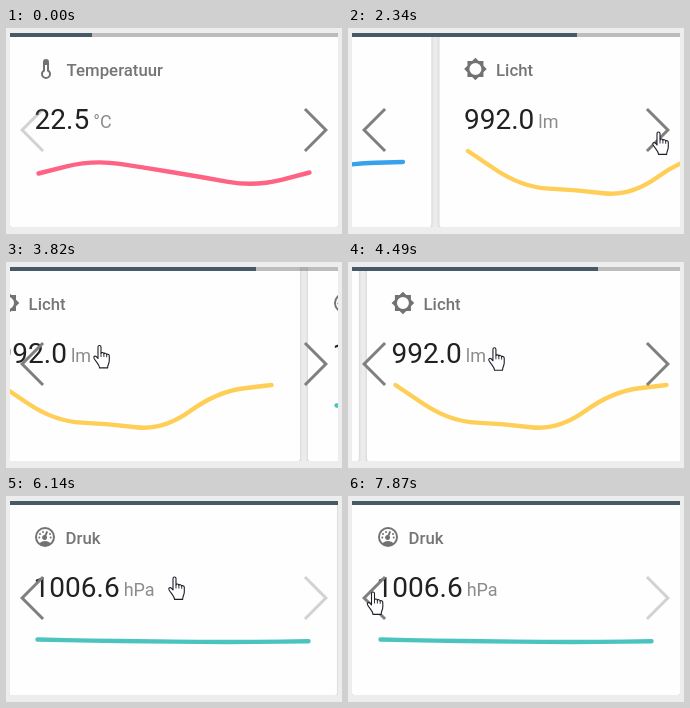
An HTML page that plays this animation: 336x206 px, repeating every 8 s.

```html
<!DOCTYPE html>
<html lang="nl">
<head>
<meta charset="utf-8">
<title>Sensor carousel</title>
<style>
  html, body { margin: 0; width: 100%; height: 100%; overflow: hidden; background: #ededed; }
  #stage { position: relative; width: 336px; height: 206px; overflow: hidden; }
  #view { position: absolute; left: 4px; top: 5px; width: 328px; height: 194px; overflow: hidden; }
  #track { position: absolute; inset: 0; }
  .card {
    position: absolute; top: 0; width: 328px; height: 194px; background: #fefefe; border-radius: 2px;
    box-shadow: 0 2px 2px rgba(0,0,0,.1), 0 1px 4px rgba(0,0,0,.1);
  }
  svg { position: absolute; left: 0; top: 0; display: block; overflow: visible; }
  text { font-family: Roboto, "Open Sans", sans-serif; }
  .name { font-size: 16.8px; font-weight: 500; fill: #757575; }
  .value { font-size: 28px; fill: #212121; }
  .unit { font-size: 18px; fill: #8c8c8c; }
  .icon { fill: #727272; fill-rule: evenodd; }
  .line { fill: none; stroke-width: 4.4; stroke-linecap: round; stroke-linejoin: round; }
  .arrow { fill: #7f7f7f; }
  #rail { position: absolute; left: 0; top: 0; width: 100%; height: 4px; background: rgba(0,0,0,.26); }
  #bar { height: 100%; background: #455a64; }
</style>
</head>
<body>
<div id="stage">
  <div id="view">
    <div id="track"></div>
    <div id="rail"><div id="bar"></div></div>
  </div>
  <svg width="336" height="206">
    <path id="prev" class="arrow" transform="translate(14 80)" d="M0 22 22 0l2.1 2.1L4.2 22l19.9 19.9L22 44Z"/>
    <path id="next" class="arrow" transform="translate(295 80)" d="M27 22 5 44l-2.1-2.1L22.8 22 2.9 2.1 5 0Z"/>
    <g id="hand" stroke="#1c1c28" stroke-width="1.1" stroke-linejoin="round">
      <path fill="#fff" d="M5 2.6C5 .4 8 .4 8 2.6V9C8.2 7.6 10.8 7.8 10.9 9.4 11.2 8.2 13.6 8.4 13.7 10.2 14 9.2 16.3 9.5 16.3 11.3V16C16.3 19 14.6 20 14.6 23.4H6.6C6.6 20.2 3.8 18.5 1 13.7.2 12 2.1 10.9 3.4 12.2L5 14Z"/>
      <path fill="none" stroke-width=".9" d="M8 9v3.5M10.9 9.4v3.1M13.7 10.2v2.6"/>
    </g>
  </svg>
</div>
<script>
const LOOP = 8000, PITCH = 336, SLIDE_MS = 300;
const $ = id => document.getElementById(id);
const mix = (a, b, p) => a + (b - a) * p;
const clamp = p => Math.min(1, Math.max(0, p));

const dot = (x, y, r) => `M${x - r} ${y}a${r} ${r} 0 1 0 ${2 * r} 0a${r} ${r} 0 1 0 ${-2 * r} 0Z`;
const icons = {
  thermometer: 'M17 17A5 5 0 0 1 7 17C7 15.4 7.8 13.9 9 13V5A3 3 0 0 1 15 5V13C16.2 13.9 17 15.4 17 17'
    + 'M11 8V14.2C9.8 14.6 9 15.7 9 17A3 3 0 0 0 15 17C15 15.7 14.2 14.6 13 14.2V8Z',
  drop: 'M12 20A6 6 0 0 1 6 14C6 10 12 3.25 12 3.25S18 10 18 14A6 6 0 0 1 12 20Z',
  sun: dot(12, 12, 6) + 'M20 15.3 23.3 12 20 8.7V4H15.3L12 .7 8.7 4H4V8.7L.7 12 4 15.3V20H8.7L12 23.3 15.3 20H20Z',
  gauge: dot(12, 12, 10) + 'M12 4A8 8 0 0 1 20 12C20 14.4 19 16.5 17.3 18 15.9 16.7 14 16 12 16S8.2 16.7 6.7 18C5 16.5 4 14.4 4 12A8 8 0 0 1 12 4Z'
    + 'M13.1 6.5 11.6 10A2.5 2.5 0 1 0 13.4 10.8L14.9 7.3A1 1 0 0 0 13.1 6.5Z'
    + dot(10, 7, 1) + dot(7, 9, 1) + dot(17, 9, 1) + dot(6.3, 12.5, 1) + dot(17.7, 12.5, 1)
};

// levels: evenly spaced heights that shape the graph
const cards = [
  { name: 'Temperatuur', value: '22.5', unit: '°C', icon: 'thermometer', color: '#ff6384',
    levels: [145.5, 131.8, 140, 149, 158.6, 144.5] },
  { name: 'Vochtigheid', value: '45.2', unit: '%', icon: 'drop', color: '#36a2eb',
    levels: [150, 158, 153, 147, 135.5, 134] },
  { name: 'Licht', value: '992.0', unit: 'lm', icon: 'sun', color: '#ffce56',
    levels: [123, 159.5, 161.8, 168.6, 129.4, 123] },
  { name: 'Druk', value: '1006.6', unit: 'hPa', icon: 'gauge', color: '#4bc4c0',
    levels: [143.5, 144.8, 145.3, 146, 146, 145.3] }
];

// Quadratic curve through the midpoints of neighbouring levels
function graph(levels) {
  const pts = levels.map((y, i) => [32.5 + i * 54.2, y]);
  const mids = pts.slice(1).map((p, i) => [(p[0] + pts[i][0]) / 2, (p[1] + pts[i][1]) / 2]);
  const curves = mids.slice(1).map((m, i) => `Q${pts[i + 1]} ${m}`);
  return `M${pts[0]}L${mids[0]}${curves.join('')}L${pts.at(-1)}`;
}

$('track').innerHTML = cards.map((c, i) => `
  <div class="card" style="left:${i * PITCH}px">
    <svg width="328" height="194" viewBox="4 5 328 194">
      <path class="icon" transform="translate(28 29)" d="${icons[c.icon]}"/>
      <text class="name" x="60.6" y="48">${c.name}</text>
      <text class="value" x="28.6" y="101">${c.value}<tspan class="unit" dx="4" dy="-1">${c.unit}</tspan></text>
      <path class="line" stroke="${c.color}" d="${graph(c.levels)}"/>
    </svg>
  </div>`).join('');

// The screen refreshes in short bursts and rests in between: [first, last, refreshes]
const bursts = [
  [460, 1010, 5], [1570, 1870, 3], [2340, 2770, 4], [3670, 3820, 2],
  [4250, 5010, 7], [5280, 5860, 5], [6140, 7070, 8], [7600, 7870, 3]
];
function refreshed(t) {
  const burst = bursts.findLast(b => b[0] <= t);
  if (!burst) return 0;
  const [first, last, count] = burst, step = (last - first) / (count - 1);
  return Math.min(last, first + Math.floor((t - first) / step + 1e-6) * step);
}

// Pointer path: [time, x, y]
const path = [
  [0, 340, 110], [460, 328, 109], [740, 320, 109], [1010, 304, 103], [2460, 304, 103], [2770, 125, 85],
  [3670, 115, 84], [3820, 87, 82.5], [4430, 145, 85], [4730, 225, 85], [5010, 154, 78], [5280, 147.5, 76],
  [5560, 60, 80], [5710, 260, 70], [5860, 163, 80], [6140, 162, 80], [6400, 80, 72], [6670, 70, 71],
  [7070, 31, 93], [7870, 18.5, 95]
];
function pointer(t) {
  const i = path.findLastIndex(p => p[0] <= t);
  const a = path[i], b = path[i + 1] || a;
  const p = b === a ? 0 : (t - a[0]) / (b[0] - a[0]);
  return [mix(a[1], b[1], p), mix(a[2], b[2], p)];
}

// Clicks and drags between slides
const gestures = [
  { down: 0, up: 0, from: 0, to: 0 },
  { down: 1553, up: 1553, from: 0, to: 1 },
  { down: 2207, up: 2207, from: 1, to: 2 },
  { down: 2770, up: 4430, from: 2, to: 2 },
  { down: 5010, up: 5420, from: 2, to: 3 },
  { down: 5860, up: 6360, from: 3, to: 3 }
];

// CSS "ease", solved by bisection
function ease(p) {
  if (p <= 0 || p >= 1) return clamp(p);
  let lo = 0, hi = 1, s;
  for (let i = 0; i < 24; i++) {
    s = (lo + hi) / 2;
    if (.75 * s * (1 - s) + s ** 3 < p) lo = s; else hi = s;
  }
  return .3 * s * (1 - s) ** 2 + 3 * (1 - s) * s * s + s ** 3;
}

function carousel(t) {
  const { down, up, from, to } = gestures.findLast(g => g.down <= t);
  let pull = pointer(down)[0] - pointer(Math.min(t, up))[0];
  if (from === cards.length - 1 && pull > 0) pull **= .85; // rubber band past the end
  const p = ease((t - up) / SLIDE_MS);
  return {
    scroll: mix(from * PITCH + pull, to * PITCH, p),
    fill: (mix(from, to, p) + 1) / cards.length,
    index: t >= up ? to : from
  };
}

function draw(now) {
  const t = refreshed(now % LOOP);
  const { scroll, fill, index } = carousel(t);
  $('track').style.transform = `translateX(${-scroll}px)`;
  $('bar').style.width = fill * 100 + '%';
  $('prev').style.opacity = index > 0 ? 1 : .35;
  $('next').style.opacity = index < cards.length - 1 ? 1 : .35;
  $('hand').setAttribute('transform', `translate(${pointer(t)})`);
}

const start = performance.now();
function tick() {
  draw(performance.now() - start);
  requestAnimationFrame(tick);
}
tick();
</script>
</body>
</html>
```
